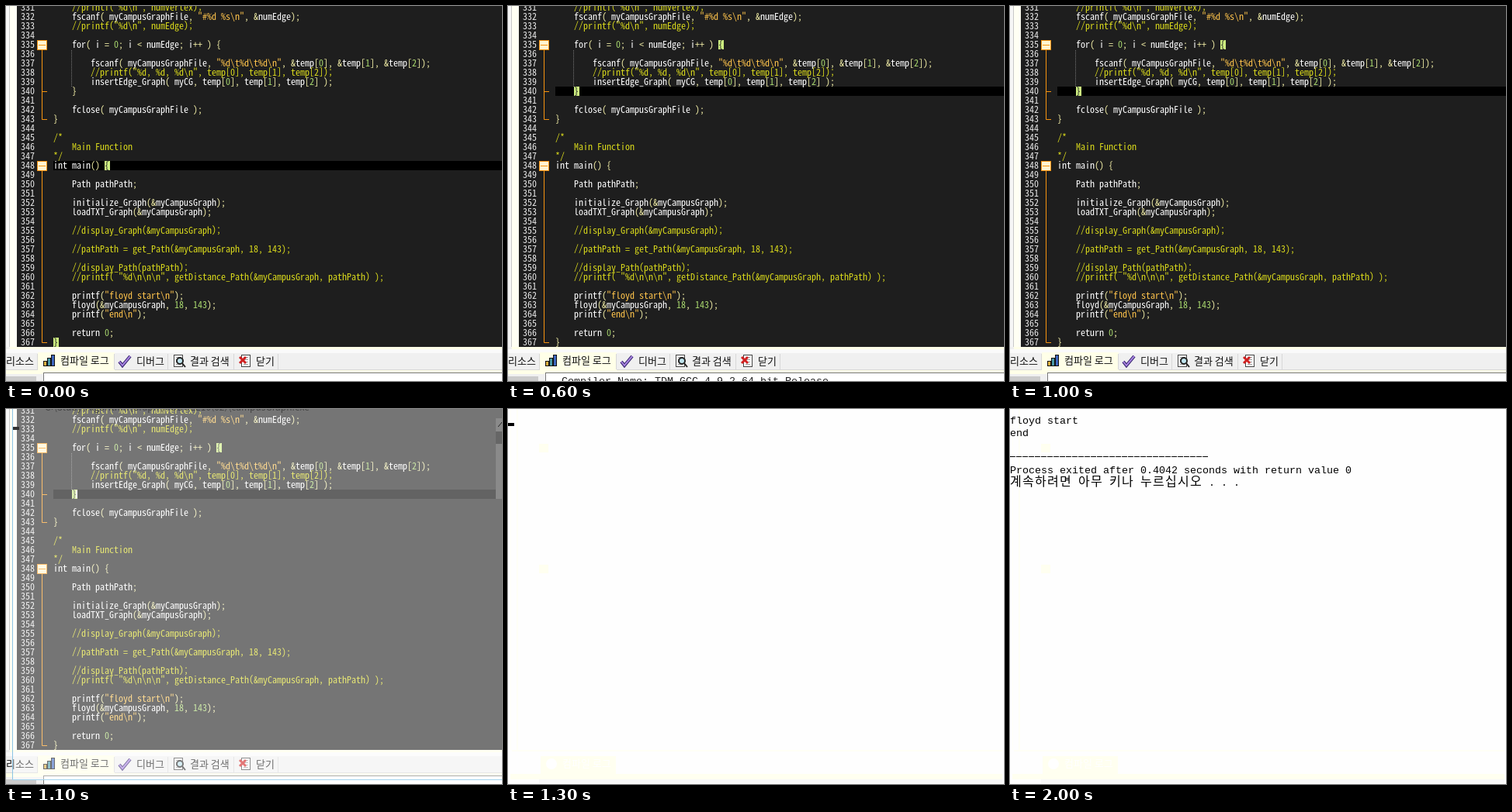
Animation of 639 by 484 pixels, one loop 2.6 s. Source, as an HTML page with a canvas:

```html
<!DOCTYPE html>
<html lang="ko">
<head>
<meta charset="utf-8">
<style>
html, body { margin: 0; width: 100%; height: 100%; overflow: hidden; background: #fff; }
canvas { display: block; }
</style>
</head>
<body>
<canvas id="stage" width="639" height="484"></canvas>
<script>
const ctx = document.getElementById('stage').getContext('2d');
const LOOP = 2600;
const SANS = '"Noto Sans CJK KR", "Noto Sans CJK", sans-serif';
const CODE_MONO = '"Noto Sans Mono CJK KR", "Noto Sans Mono", monospace';
const TYPEWRITER = '13.33px "Liberation Mono", monospace';
const ORANGE = '#f79410', COMMENT = '#d9d91c', CREAM = '#ffffe8';
const FIRST = 331;

const source = String.raw`    //printf("%d\n", numVertex);
    fscanf( myCampusGraphFile, "#%d %s\n", &numEdge);
    //printf("%d\n", numEdge);

    for( i = 0; i < numEdge; i++ ) {

        fscanf( myCampusGraphFile, "%d\t%d\t%d\n", &temp[0], &temp[1], &temp[2]);
        //printf("%d, %d, %d\n", temp[0], temp[1], temp[2]);
        insertEdge_Graph( myCG, temp[0], temp[1], temp[2] );
    }

    fclose( myCampusGraphFile );
}

/*
    Main Function
*/
int main() {

    Path pathPath;

    initialize_Graph(&myCampusGraph);
    loadTXT_Graph(&myCampusGraph);

    //display_Graph(&myCampusGraph);

    //pathPath = get_Path(&myCampusGraph, 18, 143);

    //display_Path(pathPath);
    //printf( "%d\n\n\n", getDistance_Path(&myCampusGraph, pathPath) );

    printf("floyd start\n");
    floyd(&myCampusGraph, 18, 143);
    printf("end\n");

    return 0;
}`.split('\n');

const rowY = n => 50 + 12 * (n - 335);

function rect(x, y, w, h, color) {
  ctx.fillStyle = color;
  ctx.fillRect(x, y, w, h);
}

function path(points, color, width = 1) {
  ctx.strokeStyle = color;
  ctx.lineWidth = width;
  ctx.beginPath();
  points.forEach(([x, y]) => ctx.lineTo(x, y));
  ctx.stroke();
}

function text(str, x, y, font, color) {
  ctx.font = font;
  ctx.fillStyle = color;
  ctx.fillText(str, x, y);
}

// Code font whose advance is 6px
ctx.font = '100px ' + CODE_MONO;
const codeFont = `${600 / ctx.measureText('0').width}px ${CODE_MONO}`;

function code(str, x, y, color) {
  text(str, x, y, codeFont, color);
  return x + 6 * str.length;
}

function tokenColor(token) {
  if (token.startsWith('//')) return COMMENT;
  if (token[0] === '"') return '#ffc44c';
  if (/^\d/.test(token)) return '#a9d86e';
  return /^[\w\s]/.test(token) ? '#fff' : '#f4f0a8';
}

function codeLine(line, n) {
  const y = rowY(n) + 4;
  code(String(n), 19, y, '#e8e8e8');
  if (n >= 345 && n <= 347) return code(line, 61, y, COMMENT);
  let x = 61;
  for (const token of line.match(/\/\/.*|"[^"]*"|\w+|\s+|./g) || [])
    x = code(token, x, y, tokenColor(token));
}

function brace(ch, x, n) {
  rect(x, rowY(n) - 6, 7, 12, '#cdee80');
  code(ch, x, rowY(n) + 4, '#222');
}

function fold(top, bottom, ...ticks) {
  const y = rowY(top);
  path([[46.5, y + 6], [46.5, rowY(bottom) + .5], [53, rowY(bottom) + .5]], ORANGE);
  ticks.forEach(n => path([[46, rowY(n) + .5], [53, rowY(n) + .5]], ORANGE));
  rect(40, y - 6, 13, 13, ORANGE);
  rect(41, y - 5, 11, 11, '#fff4d0');
  rect(42, y, 9, 1, ORANGE);
}

function page(x) {
  rect(x, 450, 12, 16, '#444');
  rect(x + 1, 451, 10, 14, '#fff');
  for (let y = 453; y < 464; y += 3) rect(x + 3, y, 6, 1, '#999');
}

function icons() {
  [[48, 7], [53, 11], [58, 15]].forEach(([x, h], i) => {
    rect(x, 465 - h, 5, h, '#111');
    rect(x + 1, 466 - h, 3, h - 2, ['#e0b040', '#4a9aa8', '#4068c0'][i]);
  });
  path([[146, 459], [150, 464], [160, 452]], '#32206c', 4);
  path([[146, 459], [150, 464], [160, 452]], '#a884e0', 2);
  page(216);
  ctx.strokeStyle = '#222';
  ctx.lineWidth = 2;
  ctx.fillStyle = '#bfe4ee';
  ctx.beginPath();
  ctx.arc(224, 458, 4, 0, 7);
  ctx.fill();
  ctx.stroke();
  path([[227, 461], [231, 466]], '#222', 2);
  page(303);
  path([[301, 453], [309, 461]], '#d02020', 3);
  path([[309, 453], [301, 461]], '#d02020', 3);
}

function bottomPanel(log) {
  rect(0, 440, 639, 44, '#f0f0f0');
  rect(5, 440, 634, 3, CREAM);
  rect(0, 443, 639, 5, '#fafafa');
  rect(0, 469, 639, 1, '#d8d8d8');
  rect(0, 470, 639, 5, CREAM);
  rect(41, 447, 99, 24, CREAM);
  [40, 139, 208, 293, 350].forEach(x => rect(x, 449, 1, 20, '#d8d8d8'));
  icons();
  const labels = [['리소스', 0, 463], ['컴파일 로그', 70, 462], ['디버그', 168, 463], ['결과 검색', 237, 463], ['닫기', 322, 463]];
  for (const [str, x, y] of labels) text(str, x, y, '13px ' + SANS, '#111');
  rect(0, 478, 39, 6, '#cbcbcb');
  rect(48, 473, 591, 11, '#777');
  rect(49, 474, 590, 10, '#fff');
  if (log) text('- Compiler Name: TDM-GCC 4.9.2 64-bit Release', 53, 488, TYPEWRITER, '#222');
}

function editor(line, log, caret) {
  rect(0, 0, 639, 440, '#f6f6f6');
  rect(4, 0, 1, 440, '#c8c8c8');
  rect(5, 0, 9, 440, '#fffff4');
  rect(14, 0, 625, 440, '#1e1e1e');
  rect(61, rowY(line) - 6, 578, 12, '#000');
  source.forEach((str, i) => codeLine(str, FIRST + i));
  fold(335, 343, 340);
  fold(348, 367);
  for (let y = 57; y < 104; y += 2) rect(84, y, 1, 1, '#777');
  if (line === 348) {
    brace('{', 127, 348);
    brace('}', 61, 367);
  } else {
    brace('{', 271, 335);
    brace('}', 85, 340);
    if (caret) rect(90, 105, 2, 10, '#fff');
  }
  bottomPanel(log);
}

// Console window fading in over the editor
function openingWindow(left, bottom, alpha) {
  rect(left, 0, 639 - left, bottom, `rgba(255,255,255,${alpha})`);
  rect(left, 0, 1, bottom, '#8cc4e4');
  rect(left, bottom, 639 - left, 1, '#a4d4ee');
}

function residue() {
  rect(0, 0, 639, 484, '#fefefe');
  rect(3, 0, 1, 440, '#fffff8');
  rect(11, 0, 2, 440, '#fffff6');
  rect(5, 440, 632, 2, '#fffff6');
  [50, 206].forEach(y => rect(40, y - 5, 12, 11, '#fffff0'));
  rect(42, 448, 97, 24, '#fffff0');
  rect(3, 471, 634, 7, '#fffff0');
  rect(40, 478, 597, 5, '#f8f8f8');
  ctx.fillStyle = '#fff';
  ctx.beginPath();
  ctx.arc(56, 458, 7, 0, 7);
  ctx.fill();
  text('컴파일 로그', 70, 462, '13px ' + SANS, '#fff');
}

// Terminal grid of 8 by 16 pixels, Hangul takes two cells
function consoleLine(str, row) {
  let x = 0;
  for (const ch of str) {
    const wide = /[가-힣]/.test(ch);
    text(ch, x, 19 + 16 * row, wide ? '300 16px ' + SANS : TYPEWRITER, '#000');
    x += wide ? 16 : 8;
  }
}

function cursor(x, row) {
  rect(x, 18 + 16 * row, 8, 4, '#000');
}

function consoleView(t) {
  residue();
  if (t < 1400) return cursor(0, 0);
  consoleLine('floyd start', 0);
  if (t < 1500) return cursor(0, 1);
  consoleLine('end', 1);
  for (let x = 0; x < 256; x += 8) rect(x, 61, 7, 1, '#000');
  consoleLine('Process exited after 0.4042 seconds with return value 0', 4);
  consoleLine('계속하려면 아무 키나 누르십시오 . . .', 5);
  if (t < 2000) cursor(304, 5);
}

function draw(t) {
  if (t >= 1300) return consoleView(t);
  editor(t < 100 ? 348 : 340, t >= 200 && t < 900, t < 600 || t >= 1100);
  if (t >= 1200) {
    openingWindow(2, 482, .81);
    rect(3, 20, 8, 4, '#111');
  } else if (t >= 1100) {
    openingWindow(8, 478, .39);
    text('C:\\Study\\Algorithm\\Graph\\MODULE10(02)\\campusGraph.exe', 50, 2, '12px ' + SANS, '#444');
    rect(631, 12, 8, 104, '#8a8a8a');
    rect(631, 29, 8, 16, '#666');
    path([[634, 23], [639, 17]], '#222');
    rect(9, 23, 8, 4, '#333');
  }
}

function tick(now) {
  draw(now % LOOP);
  requestAnimationFrame(tick);
}
requestAnimationFrame(tick);
</script>
</body>
</html>
```
